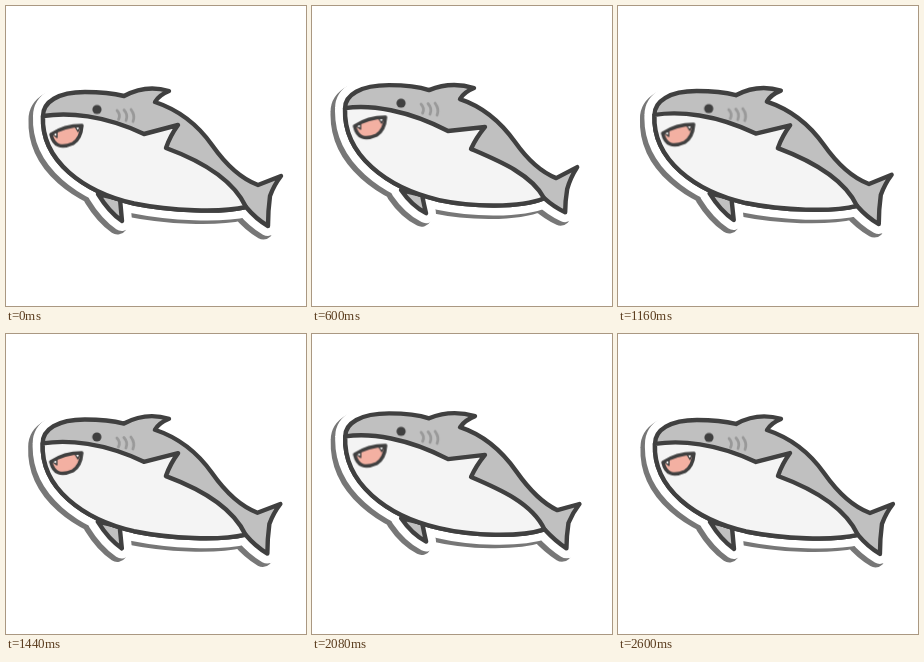
Animation, 300 px wide and 300 px high, one loop 2.64 s. Source, as an HTML page without scripts:

```html
<!DOCTYPE html>
<html lang="en">
<head>
<meta charset="utf-8">
<title>Swimming shark sticker</title>
<style>
html, body { margin: 0; width: 100%; height: 100%; overflow: hidden; background: #fff; }
svg { display: block; width: 100vw; height: 100vh; }
path { stroke-linecap: round; stroke-linejoin: round; }

.body, .belly, .fin, .eye, .mouth, .gills {
  animation: 2640ms cubic-bezier(.37, 0, .63, 1) infinite;
}
.body { animation-name: body; }
.belly { animation-name: belly; }
.fin { animation-name: fin; }
.eye { animation-name: eye; }
.gills { animation-name: gills; }
.mouth { animation-name: mouth; }

.edge path { stroke-width: 20; }
.shadow path { fill: #777; stroke: #777; }
.border path { fill: #fff; stroke: #fff; }
.shark path { stroke: #404040; stroke-width: 4.4; }
.shark .body, .shark .fin { fill: #c0c0c0; }
.shark .belly { fill: #f4f4f4; }
.shark .gills path { fill: none; stroke: #999; stroke-width: 2.8; }
.shark .mouth path { fill: #f3b0a2; stroke-width: 3.4; }
.shark .mouth .tooth { fill: #fff; stroke-width: 1.4; }

/* Tail rises on the first stroke and pulls in level on the second. */
@keyframes body {
  0%, 50%, 100% { d: path("M37 110 C37 96 52 86 79 86 Q102 86 118 90 Q140 78 163 85 Q153 89 149 96 C176 105 194 122 206 139 S233 172 252 179 L275 170 Q268 179 264 190 Q262 205 262 220 Q250 213 240 201 C215 207 165 205 128 197.5 C78 186 35 155 37 110Z"); }
  25% { d: path("M33 102 C33 89 48 79 77 79 Q102 79 117 84 Q139 75 162 82 Q152 86 148 93 C175 102 191 119 203 136 S229 166 244 172 L265 161 Q258 172 255 183 Q253 195 253 206 Q242 201 232 192 C208 202 160 201 127 194 C75 182 31 149 33 102Z"); }
  75% { d: path("M33 102 C33 89 48 79 77 79 Q102 79 117 84 Q139 75 163 82 Q153 86 148 93 C175 102 192 120 204 137 S230 169 245 176 L267 170 Q260 179 256 189 Q254 202 254 214 Q243 207 232 195 C208 203 160 202 127 194 C75 182 31 149 33 102Z"); }
}
@keyframes belly {
  0%, 50%, 100% { d: path("M37 110 C62 106 98 109 138 128 L172 119 Q164 130 160 142 C190 153 226 171 240 201 C215 207 165 205 128 197.5 C78 186 35 155 37 110Z"); }
  25% { d: path("M33 102 C58 98 96 104 136 125 L173 121 Q164 132 159 143 C187 155 219 168 232 192 C208 202 160 201 127 194 C75 182 31 149 33 102Z"); }
  75% { d: path("M33 102 C58 98 96 104 136 125 L173 121 Q164 132 159 143 C187 155 220 169 232 195 C208 203 160 202 127 194 C75 182 31 149 33 102Z"); }
}
@keyframes fin {
  0%, 50%, 100% { d: path("M92 188 Q103 206 116 215 Q115 204 114 193Z"); }
  25%, 75% { d: path("M89 184 Q100 200 114 207 Q112 199 110 189Z"); }
}
@keyframes eye {
  0%, 50%, 100% { transform: translate(91px, 103.5px); }
  25%, 75% { transform: translate(89px, 97px); }
}
@keyframes gills {
  0%, 50%, 100% { transform: translate(119px, 109.5px); }
  25%, 75% { transform: translate(117px, 103px); }
}
@keyframes mouth {
  0%, 50%, 100% { transform: translate(61px, 129.5px); }
  25%, 75% { transform: translate(58.5px, 121px); }
}
</style>
</head>
<body>
<svg viewBox="0 0 300 300">
  <g class="edge shadow" transform="translate(-4.5 3.5)">
    <path class="fin"/>
    <path class="body"/>
  </g>
  <g class="edge border">
    <path class="fin"/>
    <path class="body"/>
  </g>
  <g class="shark">
    <path class="fin"/>
    <path class="body"/>
    <path class="belly"/>
    <circle class="eye" r="4.6" fill="#404040"/>
    <g class="gills">
      <path d="M-8 -5 q4 4 1.500 9"/>
      <path d="M-1 -5.500 q4.500 5 2 10.500"/>
      <path d="M6 -6 q4.500 6 2 12"/>
    </g>
    <g class="mouth">
      <path d="M-16 -1 Q-3 -10 15 -10 Q14 3 6 8 Q-12 16 -16 -1Z"/>
      <path class="tooth" d="M-14 -1 L-10 -4 L-10 2Z"/>
      <path class="tooth" d="M8 -9 L13 -8.500 L11 -4Z"/>
    </g>
  </g>
</svg>
</body>
</html>
```
